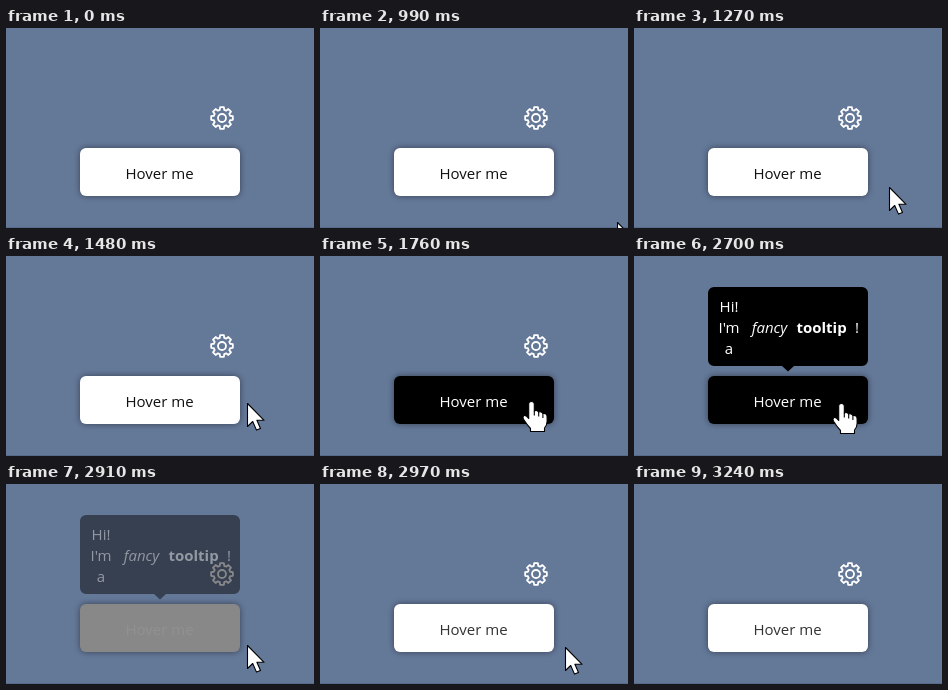
Write an HTML page with a canvas that moves like this. It is 308 by 200 pixels and loops after 4.71 s.

```html
<!DOCTYPE html>
<html lang="en">
<head>
<meta charset="utf-8">
<title>Tooltip on hover</title>
<style>
html, body { margin: 0; width: 100%; height: 100%; overflow: hidden; background: #647898; }
canvas { display: block; width: 308px; height: 200px; }
</style>
</head>
<body>
<canvas id="stage" width="308" height="200"></canvas>
<script>
const ctx = document.getElementById('stage').getContext('2d');
const LOOP = 4710;
const FONT = '15px "Open Sans", "Noto Sans", sans-serif';

// Pointer path: time, x, y
const path = [
  [990, 297, 194], [1480, 241, 147], [1760, 211, 145], [1970, 206, 147],
  [2630, 206, 147], [2700, 207, 147], [2970, 245, 163], [3170, 287, 194]
];

const clamp = v => Math.max(0, Math.min(1, v));
const ramp = (t, a, b) => clamp((t - a) / (b - a));
const easeOut = p => 1 - (1 - p) ** 1.6;
const mix = (a, b, p) => a + (b - a) * p;
const grey = v => `rgb(${Math.round(v)},${Math.round(v)},${Math.round(v)})`;

// The scene advances in short steps while the pointer moves
function stepTime(t) {
  const [start, size] = t < 2700 ? [990, 70] : [2700, 67.14];
  return start + size * Math.floor((t - start) / size);
}

function pointerAt(t) {
  if (t < path[0][0] || t > 3172) return null;
  let i = 0;
  while (i < path.length - 2 && t >= path[i + 1][0]) i++;
  const [a, b] = [path[i], path[i + 1]];
  const p = ramp(t, a[0], b[0]);
  const e = a[0] === 2970 ? p : easeOut(p);
  return { x: mix(a[1], b[1], e), y: mix(a[2], b[2], e) };
}

function box(x, y, w, h, r, fill) {
  ctx.beginPath();
  ctx.roundRect(x, y, w, h, r);
  ctx.fillStyle = fill;
  ctx.fill();
}

function label(text, x, y, fill, style = '') {
  ctx.font = `${style} ${FONT}`;
  ctx.textAlign = 'center';
  ctx.fillStyle = fill;
  ctx.fillText(text, x, y);
}

function gear(cx, cy) {
  ctx.save();
  ctx.translate(cx, cy);
  ctx.strokeStyle = '#fff';
  ctx.lineWidth = 1.8;
  ctx.lineJoin = 'round';
  ctx.beginPath();
  for (let i = 0; i < 8; i++) {
    const mid = i * Math.PI / 4;
    for (const [da, r] of [[-0.27, 8.4], [-0.17, 11], [0.17, 11], [0.27, 8.4]]) {
      ctx.lineTo(r * Math.cos(mid + da), r * Math.sin(mid + da));
    }
  }
  ctx.closePath();
  ctx.stroke();
  ctx.beginPath();
  ctx.arc(0, 0, 4, 0, Math.PI * 2);
  ctx.stroke();
  ctx.restore();
}

function button(dark, text) {
  ctx.save();
  ctx.shadowColor = 'rgba(0,0,0,.45)';
  ctx.shadowBlur = 6;
  box(74, 120, 160, 48, 6, grey(mix(255, 0, dark)));
  ctx.restore();
  label('Hover me', 153.5, 151, grey(mix(text, 255, dark)));
}

function tooltip(alpha) {
  if (!alpha) return;
  ctx.save();
  ctx.globalAlpha = alpha;
  ctx.beginPath();
  ctx.roundRect(74, 31, 160, 79, 6);
  ctx.moveTo(148, 110);
  ctx.lineTo(160, 110);
  ctx.lineTo(154, 115.5);
  ctx.closePath();
  ctx.fillStyle = '#000';
  ctx.fill();
  label('Hi!', 95, 56, '#fff');
  label("I'm", 95, 77, '#fff');
  label('a', 95, 98, '#fff');
  label('fancy', 135.5, 77, '#fff', 'italic');
  label('tooltip', 187.5, 77, '#fff', 'bold');
  label('!', 223, 77, '#fff');
  ctx.restore();
}

const arrow = new Path2D('M0 0V23L5.2 18L9 26.6L13 25L9.4 16.8H16.6Z');
const hand = new Path2D(
  'M-2.8 2.6Q-2.8 0 0 0Q2.8 0 2.8 2.6V9.6Q5 8 7.2 10.6Q9.8 9.4 11.4 12' +
  'Q15.6 11.4 15.6 15.4V20Q15.6 23.5 13 26.5V30H-1V27Q-4 24 -8 17.8' +
  'Q-9.4 15 -7.4 14Q-5.6 13.2 -2.8 17Z');

function pointer(p, over) {
  ctx.save();
  ctx.translate(Math.round(p.x) + 0.5, Math.round(p.y) + 0.5);
  const shape = over ? hand : arrow;
  ctx.fillStyle = '#fff';
  ctx.strokeStyle = '#000';
  ctx.lineWidth = 1.1;
  ctx.lineJoin = 'round';
  ctx.fill(shape);
  ctx.stroke(shape);
  if (over) {
    ctx.beginPath();
    for (const [x, y] of [[2.8, 9.6], [7.2, 10.6], [11.4, 12]]) {
      ctx.moveTo(x, y);
      ctx.lineTo(x, y + 4.5);
    }
    ctx.stroke();
  }
  ctx.restore();
}

function draw(time) {
  const t = stepTime(time);
  const p = pointerAt(t);
  const over = p && p.x < 234 && p.y > 120 && p.y < 168;
  const dark = ramp(t, 1540, 1690) * (1 - ramp(t, 2834, 2960));
  const tip = ramp(t, 1760, 1970) * (1 - ramp(t, 2834, 2960));

  ctx.fillStyle = '#647898';
  ctx.fillRect(0, 0, 308, 200);
  ctx.fillStyle = '#566a8a';
  ctx.fillRect(0, 199, 308, 1);
  gear(216, 90);
  button(dark, t < 2000 ? 16 : 50);
  tooltip(tip);
  if (p) pointer(p, over);
}

const start = performance.now();
function frame() {
  draw((performance.now() - start) % LOOP);
  requestAnimationFrame(frame);
}
frame();
</script>
</body>
</html>
```
